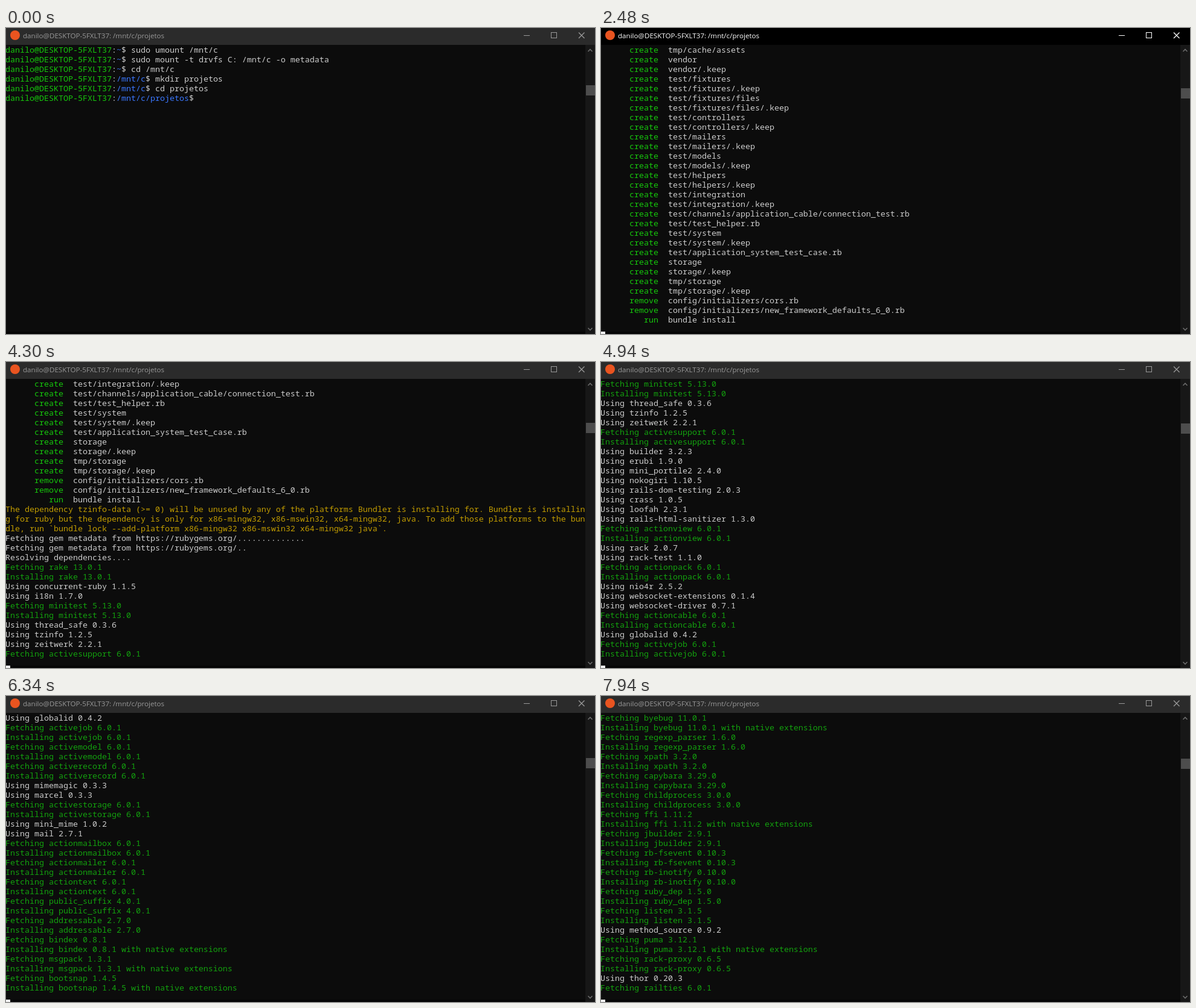
An HTML page for the animation above (7.99 s loop, 975 by 508 pixels).

```html
<!DOCTYPE html>
<html lang="pt">
<head>
<meta charset="utf-8">
<title>Terminal</title>
<style>
  html, body { margin: 0; width: 100%; height: 100%; overflow: hidden; background: #0c0c0c; }
  svg { display: block; }
  #rows text { font: 13.3333px "Noto Sans Mono", "DejaVu Sans Mono", monospace; white-space: pre; fill: #ccc; }
  #rows .bright { fill: #16c60c; }
  #rows .path { fill: #3b78ff; }
  #rows .green { fill: #13a10e; }
  #rows .warn { fill: #c19c00; }
  #title { font: 11.6px "Open Sans", "Noto Sans", sans-serif; }
</style>
</head>
<body>
<svg width="975" height="508" viewBox="0 0 975 508">
  <rect width="975" height="508" fill="#0c0c0c"/>
  <rect y="504" width="959" height="4" fill="#060606"/>
  <rect id="bar" width="975" height="28"/>
  <circle cx="15" cy="12" r="8" fill="#e95420"/>
  <text id="title" x="28" y="17"></text>
  <g id="buttons" fill="none">
    <path d="M857 12.5h10M902.5 7.5h9v9h-9z" shape-rendering="crispEdges"/>
    <path d="M948 7.5l9.5 9.5M957.5 7.5l-9.5 9.5" stroke-width="1.3"/>
  </g>
  <rect x="959" y="28" width="16" height="480" fill="#171717"/>
  <rect id="thumb" x="960" width="15" height="17" fill="#4d4d4d"/>
  <path d="M963.5 39l3.5-3.5 3.5 3.5M963.5 498l3.5 3.5 3.5-3.5" fill="none" stroke="#6b6b6b" stroke-width="1.6"/>
  <g transform="translate(-1 0)">
    <g id="rows"></g>
    <rect id="cursor" width="8" height="4" fill="#f2f2f2"/>
  </g>
</svg>
<script>
const LOOP = 7990, ROWS = 30, ROW_H = 16, COL_W = 8, TOP = 28, TICK = 46;
const HOST = 'danilo@DESKTOP-5FXLT37';
const $ = id => document.getElementById(id);

const CREATED = `

README.md
Rakefile
.ruby-version
config.ru
.gitignore
Gemfile
run:git init from "."
text:Initialized empty Git repository in /mnt/c/projetos/primeiro_app/.git/
package.json
app
app/assets/config/manifest.js
app/assets/stylesheets/application.css
app/channels/application_cable/channel.rb
app/channels/application_cable/connection.rb
app/controllers/application_controller.rb
app/helpers/application_helper.rb
app/javascript/channels/consumer.js
app/javascript/channels/index.js
app/javascript/packs/application.js
app/jobs/application_job.rb
app/mailers/application_mailer.rb
app/models/application_record.rb
app/views/layouts/application.html.erb
app/views/layouts/mailer.html.erb
app/views/layouts/mailer.text.erb
app/assets/images/.keep
app/controllers/concerns/.keep
app/models/concerns/.keep
bin
bin/rails
bin/rake
bin/setup
bin/yarn
config
config/routes.rb
config/application.rb
config/environment.rb
config/cable.yml
config/puma.rb
config/spring.rb
config/storage.yml
config/environments
config/environments/development.rb
config/environments/production.rb
config/environments/test.rb
config/initializers
config/initializers/application_controller_renderer.rb
config/initializers/assets.rb
config/initializers/backtrace_silencers.rb
config/initializers/content_security_policy.rb
config/initializers/cookies_serializer.rb
config/initializers/cors.rb
config/initializers/filter_parameter_logging.rb
config/initializers/inflections.rb
config/initializers/mime_types.rb
config/initializers/new_framework_defaults_6_0.rb
config/initializers/wrap_parameters.rb
config/locales
config/locales/en.yml
config/master.key
append:.gitignore
config/boot.rb
config/database.yml
db
db/seeds.rb
lib
lib/tasks
lib/tasks/.keep
lib/assets
lib/assets/.keep
log
log/.keep
public
public/404.html
public/422.html
public/500.html
public/apple-touch-icon-precomposed.png
public/apple-touch-icon.png
public/favicon.ico
public/robots.txt
tmp
tmp/.keep
tmp/cache
tmp/cache/assets
vendor
vendor/.keep
test/fixtures
test/fixtures/.keep
test/fixtures/files
test/fixtures/files/.keep
test/controllers
test/controllers/.keep
test/mailers
test/mailers/.keep
test/models
test/models/.keep
test/helpers
test/helpers/.keep
test/integration
test/integration/.keep
test/channels/application_cable/connection_test.rb
test/test_helper.rb
test/system
test/system/.keep
test/application_system_test_case.rb
storage
storage/.keep
tmp/storage
tmp/storage/.keep
remove:config/initializers/cors.rb
remove:config/initializers/new_framework_defaults_6_0.rb
run:bundle install`.split('\n').slice(1);

// "=" already present, "+" fetched and installed, "*" built natively
const GEMS = `+rake 13.0.1
=concurrent-ruby 1.1.5
=i18n 1.7.0
+minitest 5.13.0
=thread_safe 0.3.6
=tzinfo 1.2.5
=zeitwerk 2.2.1
+activesupport 6.0.1
=builder 3.2.3
=erubi 1.9.0
=mini_portile2 2.4.0
=nokogiri 1.10.5
=rails-dom-testing 2.0.3
=crass 1.0.5
=loofah 2.3.1
=rails-html-sanitizer 1.3.0
+actionview 6.0.1
=rack 2.0.7
=rack-test 1.1.0
+actionpack 6.0.1
=nio4r 2.5.2
=websocket-extensions 0.1.4
=websocket-driver 0.7.1
+actioncable 6.0.1
=globalid 0.4.2
+activejob 6.0.1
+activemodel 6.0.1
+activerecord 6.0.1
=mimemagic 0.3.3
=marcel 0.3.3
+activestorage 6.0.1
=mini_mime 1.0.2
=mail 2.7.1
+actionmailbox 6.0.1
+actionmailer 6.0.1
+actiontext 6.0.1
+public_suffix 4.0.1
+addressable 2.7.0
*bindex 0.8.1
*msgpack 1.3.1
*bootsnap 1.4.5
=bundler 2.0.2
*byebug 11.0.1
+regexp_parser 1.6.0
+xpath 3.2.0
+capybara 3.29.0
+childprocess 3.0.0
*ffi 1.11.2
+jbuilder 2.9.1
+rb-fsevent 0.10.3
+rb-inotify 0.10.0
+ruby_dep 1.5.0
+listen 3.1.5
=method_source 0.9.2
*puma 3.12.1
+rack-proxy 0.6.5
=thor 0.20.3
+railties 6.0.1`.split('\n');

const WARNING = 'The dependency tzinfo-data (>= 0) will be unused by any of the platforms Bundler is installing for. ' +
  'Bundler is installing for ruby but the dependency is only for x86-mingw32, x86-mswin32, x64-mingw32, java. ' +
  'To add those platforms to the bundle, run `bundle lock --add-platform x86-mingw32 x86-mswin32 x64-mingw32 java`.';

const span = (cls, s) => `<tspan class="${cls}">${s}</tspan>`;
const lines = [];
const add = (at, html, more) => lines.push({ at, html, ...more });

function prompt(at, path, cmd = '', more) {
  add(at, span('bright', HOST) + ':' + span('path', path) + '$ ', { cmd, ...more });
}

function addCreated(entry, i) {
  const [, verb = 'create', arg] = entry.match(/^(?:(\w+):)?(.*)$/);
  const at = 1480 + Math.floor(i / 5) * 43;
  add(at, verb === 'text' ? arg : span('bright', verb.padStart(12)) + '  ' + arg);
}

function gemLines(entry) {
  const gem = entry.slice(1);
  if (entry[0] === '=') return ['Using ' + gem];
  return ['Fetching ' + gem, 'Installing ' + gem + (entry[0] === '*' ? ' with native extensions' : '')];
}

// Lines already present arrive together with the next fetch; steps are even between marks.
function addGems() {
  const all = GEMS.flatMap(gemLines);
  const isStep = s => !s.startsWith('Using');
  const marks = [['Fetching activesupport', 4300], ['Installing actionmailer', 5630],
                 ['Installing ffi', 7050], ['Fetching railties', 7940]];
  let first = 0, from = 4070;
  for (const [name, to] of marks) {
    const last = all.findIndex(s => s.startsWith(name));
    const part = all.slice(first, last + 1);
    const count = part.filter(isStep).length;
    let step = 1;
    for (const s of part) {
      const at = from + (to - from) * step / count - 1;
      add(at, isStep(s) ? span('green', s) : s);
      if (isStep(s)) step++;
    }
    first = last + 1;
    from = to;
  }
}

prompt(0, '~', 'sudo umount /mnt/c');
prompt(0, '~', 'sudo mount -t drvfs C: /mnt/c -o metadata');
prompt(0, '~', 'cd /mnt/c');
prompt(0, '/mnt/c', 'mkdir projetos');
prompt(0, '/mnt/c', 'cd projetos');
prompt(0, '/mnt/c/projetos', '', { openTo: 137 });
prompt(137, '/mnt/c/projetos', 'rails _6.0.0_ new primeiro_app', { cmdAt: 235, openTo: 1430 });
CREATED.forEach(addCreated);
for (const s of WARNING.match(/.{1,120}/g)) add(3050, span('warn', s));
add(3050, 'Fetching gem metadata from https://rubygems.org/', { dots: 14, openTo: 3740 });
add(3740, 'Fetching gem metadata from https://rubygems.org/', { dots: 2, openTo: 3880 });
add(3880, 'Resolving dependencies', { dots: 4, openTo: 4070 });
addGems();

function lineHtml(line, t) {
  let s = line.html;
  if (line.cmd && t >= (line.cmdAt || 0)) s += line.cmd;
  if (line.dots) s += '.'.repeat(Math.min(line.dots, Math.floor((t - line.at) / TICK)));
  return s;
}

const rowEls = Array.from({ length: ROWS }, (_, i) => {
  const el = document.createElementNS('http://www.w3.org/2000/svg', 'text');
  el.setAttribute('y', TOP + i * ROW_H + 13);
  $('rows').append(el);
  return el;
});
const shown = rowEls.map(() => '');

const blinkOn = (t, from, step) => Math.floor((t - from) / step) % 2 === 0;

function cursorOn(t) {
  if (t < 40) return false;
  if (t < 430) return blinkOn(t, 40, 48.75);
  if (t > 2470 && t < 3050) return blinkOn(t, 2470, TICK);
  return true;
}

function drawFrame(t) {
  const active = t >= 40 && t < 2780;
  $('bar').setAttribute('fill', active ? '#000' : '#2b2b2b');
  $('title').setAttribute('fill', active ? '#fff' : '#999');
  $('buttons').setAttribute('stroke', active ? '#fff' : '#999');

  const live = lines.filter(l => t >= l.at);
  const rows = live.map(l => lineHtml(l, t));
  if (!(t < live[live.length - 1].openTo)) rows.push('');
  const scroll = Math.max(0, rows.length - ROWS);
  rowEls.forEach((el, i) => {
    const html = rows[scroll + i] || '';
    if (html !== shown[i]) el.innerHTML = shown[i] = html;
  });

  const last = rows.length - 1;
  const col = rows[last].replace(/<[^>]*>/g, '').length;
  $('cursor').setAttribute('x', col * COL_W);
  $('cursor').setAttribute('y', TOP + (last - scroll + 1) * ROW_H - 4);
  $('cursor').setAttribute('visibility', cursorOn(t) ? 'visible' : 'hidden');
  $('thumb').setAttribute('y', 100 + Math.floor((scroll - 87) / 20));
}

$('title').textContent = HOST + ': /mnt/c/projetos';
const start = performance.now();
function tick() {
  drawFrame((performance.now() - start) % LOOP);
  requestAnimationFrame(tick);
}
tick();
</script>
</body>
</html>
```
